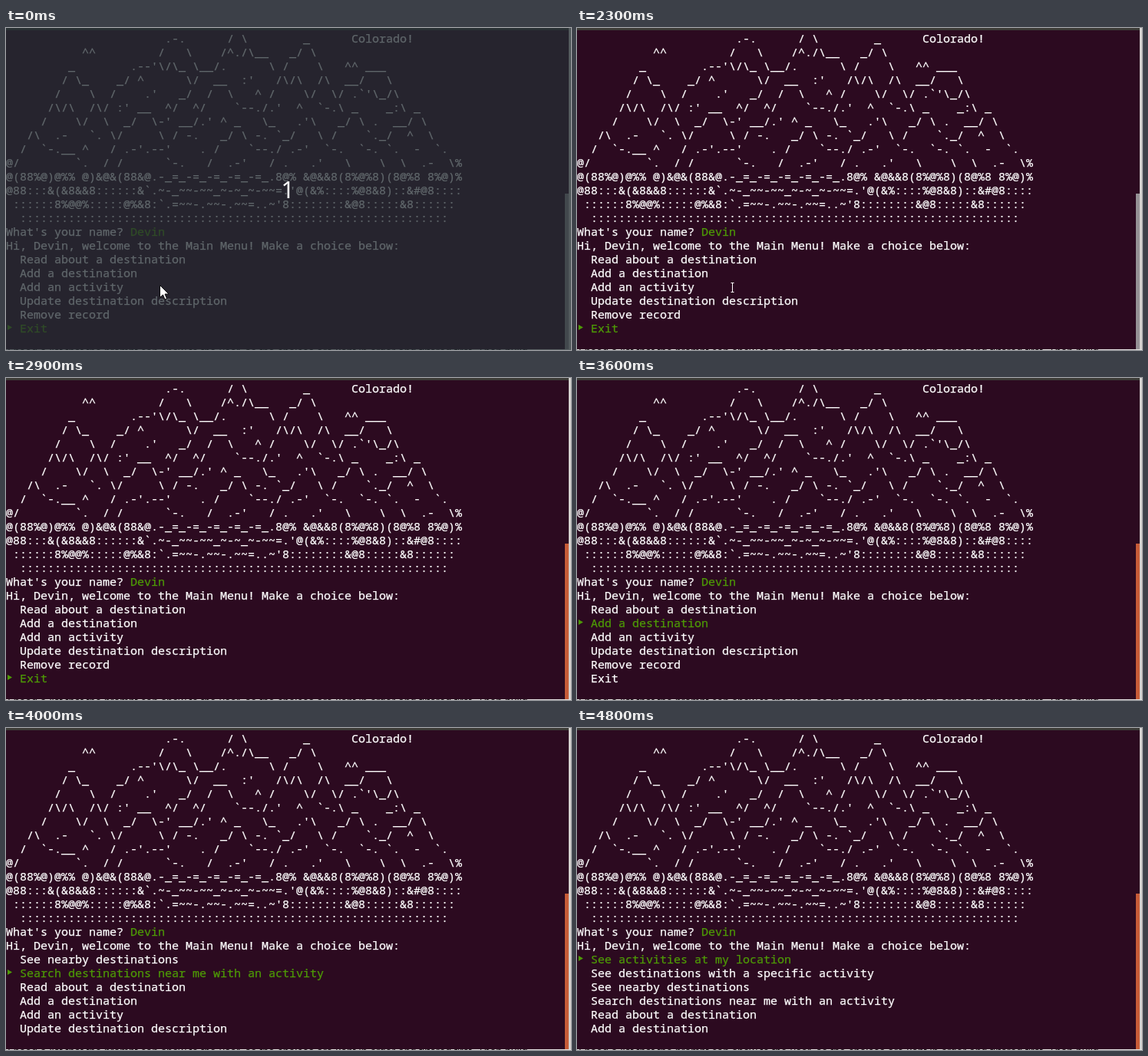
Recreate the animation shown at these times as an HTML page. Size 736 by 420 pixels, loop 8 s.

```html
<!DOCTYPE html>
<html lang="en">
<head>
<meta charset="utf-8">
<title>Terminal menu</title>
<style>
html, body { margin: 0; width: 100%; height: 100%; overflow: hidden; background: #2c0a20; }
#stage { position: relative; width: 736px; height: 420px; overflow: hidden; background: #2c0a20; color: #fff; }
#stage > * { position: absolute; }
pre, #menu { margin: 0; left: 0; font: 15px/18px "Noto Sans Mono", monospace; font-variant-ligatures: none; white-space: pre; -webkit-text-stroke: .25px; }
pre { top: 4px; }
#menu { top: 292px; }
#menu div { position: relative; height: 18px; padding-left: 18px; }
.active, b { color: #4e9a06; font-weight: normal; }
.active::before { content: ""; position: absolute; left: 2px; top: 5px; width: 6px; height: 7px; background: currentColor; clip-path: polygon(0 0, 100% 50%, 0 100%); }
#top { left: 0; top: 0; width: 733px; height: 3px; background: #3d3c38; }
#edge { left: 733px; top: 0; width: 3px; height: 420px; background: #d5d2d0; }
#thumb { left: 728px; top: 216px; width: 5px; height: 203px; }
#behind { left: 0; top: 419px; width: 736px; height: 1px; overflow: hidden; background: #e4e2e0; color: #222; font: 14px/14px "Liberation Sans", sans-serif; white-space: nowrap; text-indent: 1px; }
#behind span { position: absolute; top: -4px; }
#dim { inset: 0; background: rgba(36, 46, 52, .73); }
#count { left: 317px; width: 100px; top: 191px; text-align: center; font: 30px/40px "Noto Sans", sans-serif; }
svg { left: 0; top: 0; }
</style>
</head>
<body>
<div id="stage">
<pre>
                       .-.      / \        _      Colorado!
           ^^         /   \    /^./\__   _/ \
         _        .--'\/\_ \__/.      \ /    \   ^^ ___
        / \_    _/ ^      \/  __  :'   /\/\  /\  __/   \
       /    \  /    .'   _/  /  \   ^ /    \/  \/ .`'\_/\
      /\/\  /\/ :' __  ^/  ^/    `--./.'  ^  `-.\ _    _:\ _
     /    \/  \  _/  \-' __/.' ^ _   \_   .'\   _/ \ .  __/ \
   /\  .-   `. \/     \ / -.   _/ \ -. `_/   \ /    `._/  ^  \
  /  `-.__ ^   / .-'.--'    . /    `--./ .-'  `-.  `-. `.  -  `.
@/        `.  / /      `-.   /  .-'   / .   .'   \    \  \  .-  \%
@(88%@)@%% @)&@&(88&@.-_=_-=_-=_-=_-=_.8@% &@&&8(8%@%8)(8@%8 8%@)%
@88:::&(&8&&8::::::&`.~-_~~-~~_~-~_~-~~=.'@(&%::::%@8&8)::&amp;#@8::::
 ::::::8%@@%:::::@%&8:`.=~~-.~~-.~~=..~'8::::::::&@8:::::&8::::::
  ::::::::::::::::::::::::::::::::::::::::::::::::::::::::::::::
What's your name? <b>Devin</b>
Hi, Devin, welcome to the Main Menu! Make a choice below:</pre>
<div id="menu"></div>
<div id="top"></div>
<div id="edge"></div>
<div id="thumb"></div>
<div id="behind"><span>I need a list that the prompt can show to the user, so the choices are kept in order and filtered first. Then build</span></div>
<svg id="beam" width="736" height="420"><path d="M200.5 332.5h4M200.5 344.5h4M202.5 332.5v12" fill="none" stroke="#fff"/></svg>
<div id="dim"></div>
<div id="count">1</div>
<svg id="arrow" width="736" height="420"><path d="M200.5 335.5v16l4-3.5 2.5 6 2.5-1-2.5-6h5z" fill="#fff" stroke="#111"/></svg>
</div>
<script>
const LOOP = 8000, ROWS = 6;
const choices = [
  "See activities at my location",
  "See destinations with a specific activity",
  "See nearby destinations",
  "Search destinations near me with an activity",
  "Read about a destination",
  "Add a destination",
  "Add an activity",
  "Update destination description",
  "Remove record",
  "Exit"
];
// [start ms, first visible choice, active choice]
const steps = [
  [0, 4, 9], [3000, 4, 8], [3200, 4, 7], [3400, 4, 6],
  [3600, 4, 5], [4000, 2, 3], [4500, 1, 2], [4800, 0, 0]
];

const el = id => document.getElementById(id);
const show = (id, visible) => { el(id).style.display = visible ? "" : "none"; };
let shown;

function drawMenu(step) {
  if (step === shown) return;
  shown = step;
  const [, first, active] = step;
  el("menu").innerHTML = choices.slice(first, first + ROWS)
    .map((text, i) => `<div class="${first + i === active ? "active" : ""}">${text}</div>`)
    .join("");
}

function render() {
  const t = performance.now() % LOOP;
  const paused = t < 500;
  drawMenu(steps.findLast(([start]) => t >= start));
  for (const id of ["dim", "count", "arrow"]) show(id, paused);
  show("beam", !paused && t < 2900);
  el("thumb").style.background = t < 2400 ? "#959195" : "#c75c38";
  requestAnimationFrame(render);
}
render();
</script>
</body>
</html>
```
